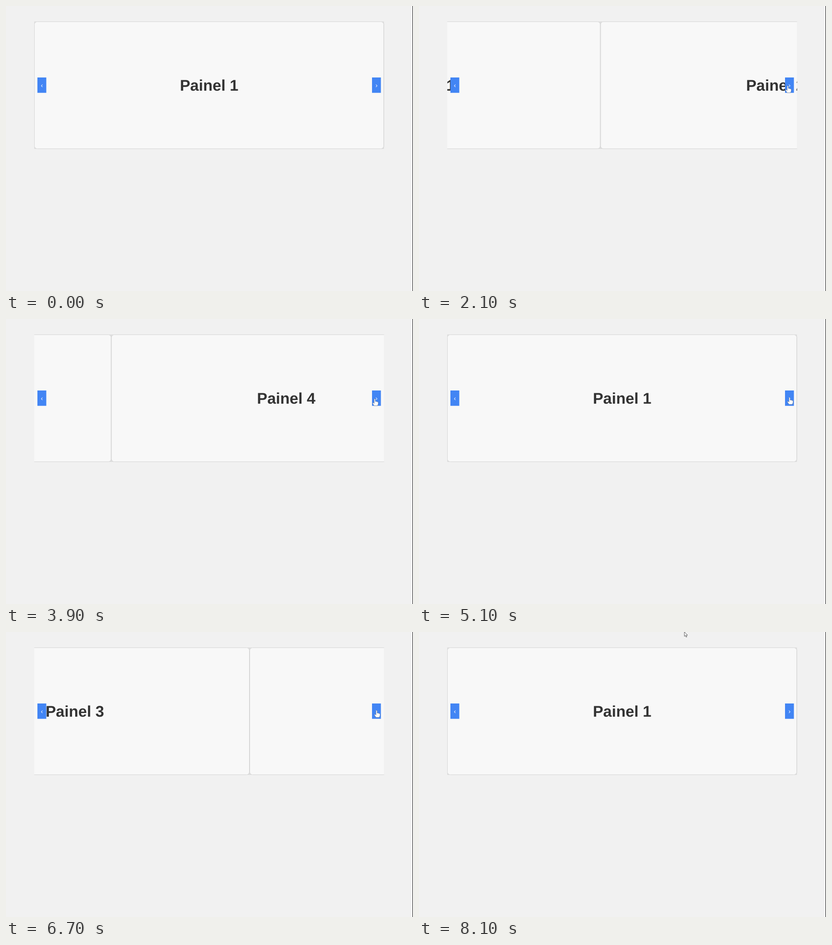
Recreate the animation shown at these times as an HTML page. Size 894 by 626 pixels, loop 8400 ms.

```html
<!DOCTYPE html>
<html lang="pt">
<head>
<meta charset="utf-8">
<title>Painel</title>
<style>
  html, body { margin: 0; width: 100%; height: 100%; overflow: hidden; background: #f1f1f1; }
  svg { display: block; width: 894px; height: 626px; }
  text {
    font-family: "Liberation Sans", Arial, sans-serif;
    text-anchor: middle;
    text-rendering: geometricPrecision;
  }
  .panel rect { fill: #f8f8f8; stroke: #d6d6d6; }
  .panel text { font-size: 34px; font-weight: bold; fill: #333; }
  .button rect { fill: #4285f4; }
  .button text { font-size: 14px; fill: #fff; }
  .cursor { fill: #fff; stroke: #333; stroke-width: .8; stroke-linejoin: round; }
  #hand { stroke-opacity: .5; }
</style>
</head>
<body>
<svg viewBox="0 0 894 626">
  <defs>
    <clipPath id="view"><rect x="62" y="34" width="768.5" height="280"/></clipPath>
  </defs>
  <rect width="894" height="626" fill="#f1f1f1"/>
  <g clip-path="url(#view)">
    <rect x="62" y="34" width="768.5" height="280" fill="#ddd"/>
    <g id="track"></g>
  </g>
  <g class="button">
    <rect x="69" y="157" width="19.5" height="33.7"/>
    <text x="78.8" y="178.7">‹</text>
  </g>
  <g class="button">
    <rect x="804" y="157" width="19.5" height="33.7"/>
    <text x="813.8" y="178.7">›</text>
  </g>
  <path id="hand" class="cursor" d="M-1.2 .8Q0-.8 1.2.8V6.2Q2.4 5 3.5 6.6Q4.8 5.6 5.8 7.2Q7.4 6.6 7.6 8.4V11.5L6 15.6H-1.2L-4.6 10.4Q-5.2 8.4-3.2 8.8L-1.2 10.4Z"/>
  <path id="arrow" class="cursor" d="M0 0V9.6L2.2 7.6L3.8 11.2L5.4 10.5L3.9 7H7Z"/>
  <rect x="893" width="1" height="626" fill="#111"/>
</svg>
<script>
  const LOOP = 8400, STEP = 100, SLIDE = 500, WIDTH = 768, PANELS = 4;

  // Each click moves on by one panel and wraps after the last
  const clicks = [1832, 2370, 3081, 3805, 5250, 5834, 6484, 7150];

  const byId = id => document.getElementById(id);
  const track = byId("track"), hand = byId("hand"), arrow = byId("arrow");

  track.innerHTML = Array.from({ length: PANELS }, (_, i) => `
    <g class="panel" transform="translate(${62 + i * WIDTH} 34)">
      <rect x=".5" y=".5" width="767" height="279" rx="6"/>
      <text x="384.2" y="152">Painel ${i + 1}</text>
    </g>`).join("");

  const ramp = (t, from, to) => Math.min(1, Math.max(0, (t - from) / (to - from)));

  // cubic-bezier(.42, 0, .58, 1)
  function easeInOut(x) {
    let lo = 0, hi = 1;
    for (let i = 0; i < 24; i++) {
      const s = (lo + hi) / 2, r = 1 - s;
      if (1.26 * r * r * s + 1.74 * r * s * s + s * s * s < x) lo = s;
      else hi = s;
    }
    return lo * lo * (3 - 2 * lo);
  }

  function position(t) {
    return clicks.reduce((pos, start, i) => {
      const p = ramp(t, start, start + SLIDE), to = (i + 1) % PANELS;
      return p === 1 ? to : pos + (to - pos) * easeInOut(p);
    }, 0);
  }

  // Enter from the right, rest on the button, shift a little, leave at the top
  function pointer(t) {
    if (t >= 8100) return [583, 0];
    if (t < 1200) return null;
    const enter = ramp(t, 1200, 1400);
    const shift = ramp(t, 4500, 5100);
    const leave = ramp(t, 7400, 7700);
    return [
      886 - 76 * enter + 4 * shift + 12 * Math.sin(Math.PI * shift) + 15 * leave,
      52 + 123 * enter - 3 * shift - 192 * leave
    ];
  }

  function place(el, at) {
    el.style.display = at ? "" : "none";
    if (at) el.setAttribute("transform", `translate(${at[0]} ${at[1]})`);
  }

  function draw(t) {
    track.setAttribute("transform", `translate(${-WIDTH * position(t)} 0)`);
    const at = pointer(t);
    const over = at && at[0] >= 804 && at[0] <= 823.5 && at[1] >= 157 && at[1] <= 191;
    place(hand, over ? at : null);
    place(arrow, over ? null : at);
  }

  const began = performance.now();
  function tick() {
    const t = (performance.now() - began) % LOOP;
    draw(Math.floor(t / STEP) * STEP);
    requestAnimationFrame(tick);
  }
  tick();
</script>
</body>
</html>
```
